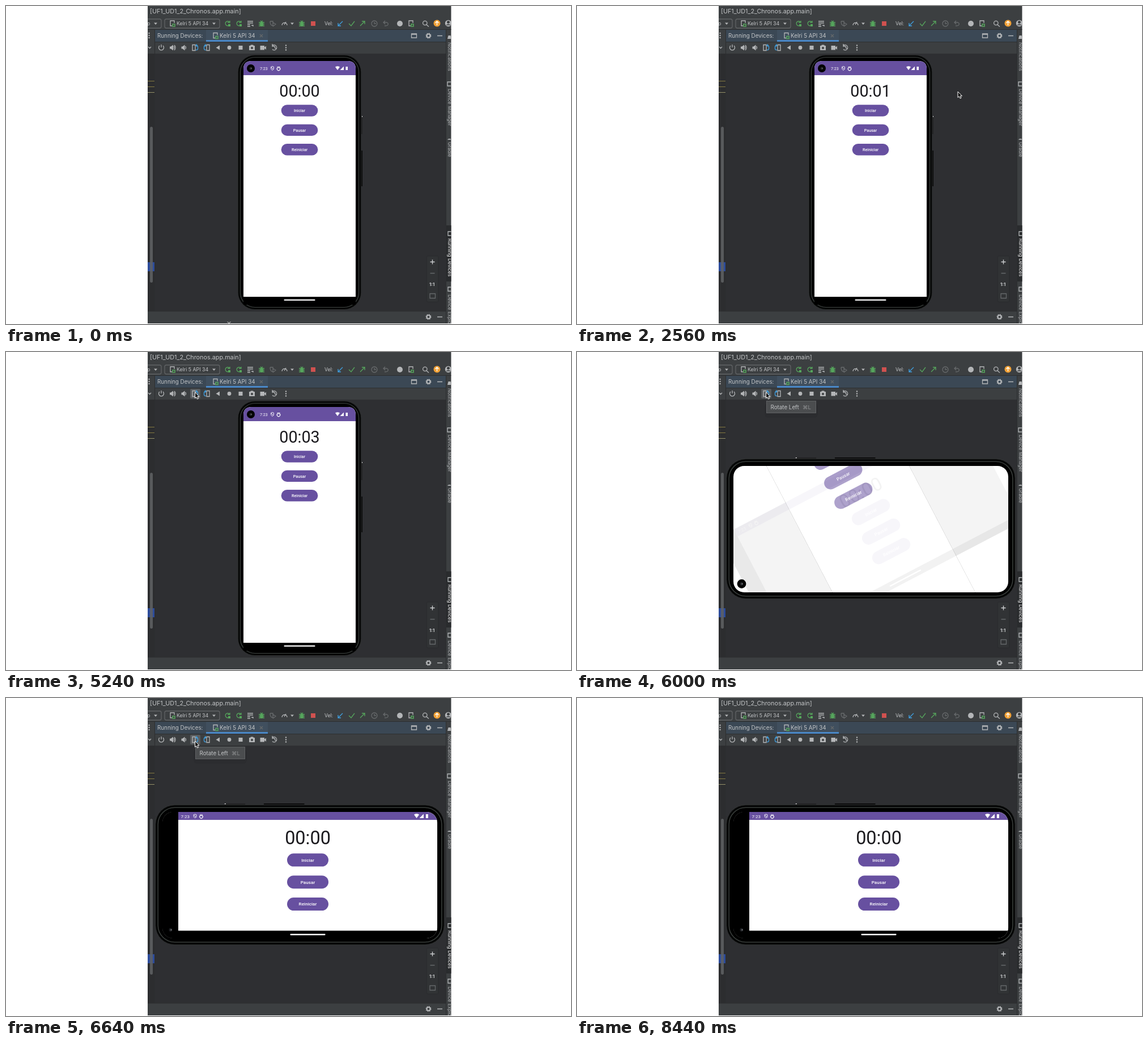
An HTML page for the animation above (8.96 s loop, 997x561 px).

```html
<!DOCTYPE html>
<html lang="es">
<head>
<meta charset="utf-8">
<style>
html, body { margin: 0; width: 100%; height: 100%; overflow: hidden; background: #fff }
svg { display: block; width: 997px; height: 561px; font-family: Inter, "Open Sans", sans-serif }
.line { fill: none; stroke: #b4b6b8; stroke-width: 1.3 }
.gray { fill: #b4b6b8 }
.dim { stroke: #66696b }
.green { stroke: #56a55c }
.blue { stroke: #3f9fe0 }
.roboto { font-family: Roboto, sans-serif }
</style>
</head>
<body>
<svg viewBox="0 0 997 561">
<defs>
  <clipPath id="win"><path d="M250 0H785.5V560H250Z"/></clipPath>
  <clipPath id="tallClip"><path d="M-99 215V-201Q-99-215-85-215H85Q99-215 99-201V215Z"/></clipPath>
  <clipPath id="wideClip"><rect x="-242.5" y="-111.5" width="485" height="223" rx="19"/></clipPath>
  <g id="gear" class="line"><circle r="3" stroke-width="2"/><circle r="4.2" stroke-width="1.6" stroke-dasharray="1.7 1.6"/></g>
  <g id="phone" class="line"><path d="M4-1V-5H-3V4H0"/><path class="green" d="M1 1H5V5H1Z" stroke-width="1.6"/></g>
  <g id="rerun" class="line green"><path d="M3-3A4 4 0 1 0 4 1M4-5V-2H0"/><path d="M1 1H5V5H1Z" fill="#56a55c" stroke="none"/></g>
  <g id="bug"><ellipse cy="1" rx="3" ry="4" fill="#56a55c"/><path class="line green" d="M-5-2H5M-5 1H5M-5 4H5M-2-5L0-3L2-5" stroke-width="1"/></g>
  <path id="down" class="gray" d="M-3-1.5H3L0 2Z"/>
  <g id="dots" class="gray"><circle cy="-4" r="1.2"/><circle r="1.2"/><circle cy="4" r="1.2"/></g>
  <g id="sound"><path class="gray" d="M-5-2H-3L1-5V5L-3 2H-5Z"/><path class="line" d="M2-2.5Q4 0 2 2.5"/></g>
  <g id="turn"><path class="line" d="M-5-5H0V5H-5Z"/><path class="line blue" d="M2-4Q5-4 4.5 0V2Q4 4.5 1 4M3-6L1-4L3-2" stroke-width="1.5"/></g>
  <g id="alerts"><path d="M-2.5-2.5L0-3.5L2.5-2.5Q3 2 0 3.5Q-3 2-2.5-2.5ZM-2-2L2 2" fill="none" stroke="#fff" stroke-width=".9"/>
    <path d="M8.5-2.5H13.5M9-1A2.8 2.8 0 1 0 13-1Z" fill="none" stroke="#fff" stroke-width="1.1"/></g>
  <path id="signal" d="M0-2.5Q4-5 8-2.5L4 3ZM15-3.5V3H8.5ZM18.5-3H22V3H18.5Z" fill="#fff"/>
  <g id="app" class="roboto" text-anchor="middle">
    <text id="count" y="-24.4" font-size="28.7" fill="#1b1a1e">00:00</text>
    <g fill="#6750a0"><rect id="pill" x="-32.3" y="-10.2" width="64.6" height="20.4" rx="10.2"/>
      <use href="#pill" y="34.4"/><use href="#pill" y="68.8"/></g>
    <g fill="#fff" font-size="7.1" font-weight="500" letter-spacing=".05">
      <text y="2.6">Iniciar</text><text y="37">Pausar</text><text y="71.4">Reiniciar</text></g>
  </g>
</defs>

<g clip-path="url(#win)">
  <path d="M250 0H786V560H250Z" fill="#3c3f41"/>
  <path d="M262 84H776V538H262Z" fill="#2e2f32"/>
  <path d="M250 84H262V538H250Z" fill="#2c2d2f"/>
  <path d="M262 42H776V63H262Z" fill="#3b4855"/>
  <path d="M353 42H462V63H353Z" fill="#404f5e"/>
  <path d="M353 60H462V63H353Z" fill="#4a88c7"/>
  <path d="M776 387H786V486H776Z" fill="#292b2d"/>
  <path d="M250 41.5H786M262 63.5H776M262.5 42V538M250 538.5H776M776.5 42V560" stroke="#2c2e30" fill="none"/>
  <path d="M250 132.5H262M250 142.5H262" stroke="#857a42"/>
  <path d="M250 152.5H262" stroke="#949068"/>
  <path d="M250 452H262V468H250Z" fill="#2d4c9b"/>
  <rect x="254" y="213" width="5" height="275" rx="2.5" fill="#606264" opacity=".85"/>

  <g fill="#c3c5c7" font-size="9.8">
    <text x="254" y="12.6" font-size="10.8">[UF1_UD1_2_Chronos.app.main]</text>
    <text x="249" y="34" font-size="8.8">p</text>
    <text x="301" y="34.3" font-size="8.8">Kelri 5 API 34</text>
    <text x="562" y="34.3" font-size="8.6">Vel:</text>
    <text x="267" y="56">Running Devices:</text>
    <text x="377" y="56">Kelri 5 API 34</text>
  </g>

  <!-- main toolbar -->
  <path class="line" stroke-width="1" style="stroke:#606365" d="M250 23H271Q274 23 274 26V36Q274 39 271 39H250M283 23H374Q377 23 377 26V36Q377 39 374 39H283Q280 39 280 36V26Q280 23 283 23Z"/>
  <use href="#down" x="264" y="31"/><use href="#down" x="367" y="31"/><use href="#down" x="505" y="31"/>
  <use href="#phone" x="293" y="31"/><use href="#phone" x="714" y="31"/><use href="#phone" x="369" y="52.5"/>
  <use href="#rerun" x="391" y="31"/><use href="#rerun" x="411" y="31"/>
  <use href="#bug" x="451" y="31"/><use href="#bug" x="522" y="31"/>
  <path class="line" d="M426 27H436M426 30H436M426 33H431M426 36H431M433 34H436V36M487 34A4.5 4.5 0 1 1 496 34M491 33L494 28"/>
  <path class="line dim" d="M466 27H471V35Q466 34 466 27M471 29L476 32L471 36M655 31A5 5 0 1 1 645 31A5 5 0 1 1 655 31M650 28V31H653M666 29H672Q675 30 674 33Q673 35 668 35M669 26L666 29L669 32"/>
  <path d="M538 27H546V35H538Z" fill="#d0514f"/>
  <path class="line blue" stroke-width="1.7" d="M594 27L586 35M586 30V35H591"/>
  <path class="line green" stroke-width="1.8" d="M605 31L609 35L615 27M625 35L633 27M628 27H633V32"/>
  <circle class="gray" cx="695" cy="31" r="5"/>
  <path class="line" stroke-width="1.5" d="M743 30A3.7 3.7 0 1 1 735.6 30A3.7 3.7 0 1 1 743 30M742 33L746 36.5"/>
  <circle cx="760.5" cy="30.5" r="6" fill="#f0a035"/>
  <path class="line" style="stroke:#fff" d="M760.5 34V27M757.5 30L760.5 27L763.5 30"/>
  <g class="gray"><circle cx="780.5" cy="30.5" r="5.7"/><path fill="#3c3f41" d="M778 28.5A2.3 2.3 0 1 1 783 28.5A2.3 2.3 0 1 1 778 28.5M776 34Q780.5 30 785 34Z"/></g>

  <!-- panel header and device toolbar -->
  <use href="#dots" x="252.5" y="52"/><use href="#dots" x="494" y="73.5"/>
  <path class="line dim" stroke-width="1" d="M448 50L453 55M453 50L448 55"/>
  <path class="line" d="M715.5 49H724.5V56H715.5ZM715.5 50H724.5M761 52.5H770M761 548.5H770M251 72L253.5 74.5L256 72"/>
  <use href="#gear" x="745.5" y="52.5"/><use href="#gear" x="745.5" y="548.5"/>
  <rect id="hover" x="325" y="65" width="18" height="17" rx="2" fill="#5a5e61"/>
  <path class="line" d="M271 70A4.5 4.5 0 1 0 277 70M274 68V73M470 70A4.5 4.5 0 1 1 470 76.5M470 67V71H474M474.5 71V74L477 75"/>
  <use href="#sound" x="294" y="73.5"/><path class="line" d="M297 69Q301 73.5 297 78"/>
  <use href="#sound" x="314.5" y="73.5"/>
  <use href="#turn" x="334" y="73.5"/><use href="#turn" transform="translate(354 73.5) scale(-1 1)"/>
  <path class="gray" d="M377 69.5V77.5L370.5 73.5ZM410.5 70H417.5V77H410.5ZM429 70H431L432 68.5H436L437 70H439V78H429ZM448.5 70H456V77.5H448.5ZM456 73L459 70.5V77L456 74.5Z"/>
  <circle class="gray" cx="394" cy="73.5" r="3.4"/><circle cx="434" cy="74" r="2" fill="#3c3f41"/>

  <!-- right tool strip -->
  <g class="gray" font-size="8.5">
    <path d="M779 58L780.5 52H784.5L786 58ZM779 236A4 4 0 0 1 786 236Z"/>
    <path class="line" stroke-width="1.1" d="M779 134H786V141H779ZM786 398H780V405H786M786 496H780V503H786"/>
    <text transform="translate(779.5 64)rotate(90)">Notifications</text>
    <text transform="translate(779.5 146)rotate(90)">Device Manager</text>
    <text transform="translate(779.5 240)rotate(90)">Gradle</text>
    <text transform="translate(779.5 410)rotate(90)" fill="#f0f0f0">Running Devices</text>
    <text transform="translate(779.5 509)rotate(90)">Device Explorer</text>
  </g>

  <!-- device -->
  <g id="body">
    <path d="M109-117H110.5V-85H109Z" fill="#1c1d1d"/><path d="M110-117H111V-115H110Z" fill="#ddd"/>
    <path d="M109-56H111V7H109Z" fill="#0b0b0b"/>
    <rect x="-108.7" y="-224.5" width="217.4" height="449" rx="30" fill="#060707" stroke="#343735" stroke-width=".7"/>
    <rect x="-104.5" y="-220.5" width="209" height="441" rx="26" fill="#000" stroke="#3f4441" stroke-width="1.2"/>
  </g>
  <g id="frame">
    <rect id="blank" x="-242.5" y="-111.5" width="485" height="223" fill="#fff"/>
    <path id="shade" d="M-242.5-111.5H242.5V111.5H-242.5Z" fill="#f4f4f4"/>
    <g id="tall"><g clip-path="url(#tallClip)">
      <path d="M-99-215H99V215H-99Z"/>
      <path d="M-99-215H99V201H-99Z" fill="#fff"/>
      <path d="M-99-215H99V-190H-99Z" fill="#6750a0"/>
      <text class="roboto" x="-70" y="-199.4" font-size="7.1" fill="#fff">7:23</text>
      <use href="#alerts" x="-48" y="-202"/><use href="#signal" x="63" y="-202"/>
      <rect x="-27.5" y="205.5" width="55" height="2.2" rx="1" fill="#fff"/>
      <use href="#app" y="-127.5"/>
      <path id="wash" d="M-99-215H99V215H-99Z" fill="#fff"/>
    </g></g>
    <g id="wide">
      <path d="M-242.5-111.5H242.5V111.5H-242.5Z"/>
      <path id="strip" d="M-242.5-111.5H-214.5V111.5H-242.5Z"/>
      <path d="M-214.5-111.5H242.5V98H-214.5Z" fill="#fff"/>
      <path d="M-214.5-111.5H242.5V-97.5H-214.5Z" fill="#6750a0"/>
      <text class="roboto" x="-210" y="-101" font-size="8" fill="#fff">7:23</text>
      <use href="#alerts" x="-185" y="-104"/><use href="#signal" transform="translate(201.5 -104)scale(1.13)"/>
      <rect x="-17" y="103.5" width="62" height="2.4" rx="1" fill="#fff"/>
      <use href="#app" transform="translate(14 -26.7)scale(1.13)"/>
      <path id="veil" d="M-214.5-111.5H242.5V111.5H-214.5Z"/>
    </g>
  </g>
  <g id="camera"><circle r="7"/><circle r="2.6" fill="#202226"/><circle cx=".8" r=".8" fill="#999"/></g>

  <!-- zoom controls -->
  <rect x="742.5" y="441" width="20.5" height="81" rx="2" fill="#313335" stroke="#292b2d"/>
  <path class="line" style="stroke:#d0d2d4" stroke-width="1.5" d="M748.5 451.5H756.5M752.5 447.5V455.5"/>
  <path class="line dim" stroke-width="1" d="M748.5 471.5H756.5M748 507.5H757.5V515.5H748Z"/>
  <text x="747" y="494.3" font-size="7.8" font-weight="700" fill="#d0d2d4">1:1</text>

  <g id="tip">
    <rect x="331" y="90" width="94" height="26" rx="6" opacity=".06"/>
    <rect x="334.5" y="86.5" width="87" height="21" fill="#4b4d4f" stroke="#5f6163"/>
    <text x="341.5" y="100.8" font-size="9.8" fill="#c3c5c7">Rotate Left</text>
    <text x="398" y="100.8" font-size="9.6" fill="#909294" style="font-family:Inter,'DejaVu Sans',sans-serif">⌘L</text>
  </g>
  <path id="beam" d="M390.5 557.5Q393 557.5 393.5 560Q394 557.5 396.5 557.5" fill="none" stroke="#ddd"/>
  <path id="arrow" d="M0 0V10.5L2.3 8.4L4 12L6 11.2L4.3 7.7H7.5Z" fill="#111" stroke="#fff"/>
</g>
</svg>
<script>
const LOOP = 8960, TURN = 5520, SPIN = 5905, SWAP = 6000, SPIN_END = 6240;
const $ = id => document.getElementById(id);
const clamp = v => Math.min(1, Math.max(0, v));
const ramp = (t, a, b) => clamp((t - a) / (b - a));
const set = (id, name, value) => $(id).setAttribute(name, value);
const fade = (id, v) => set(id, 'opacity', v);

// pointer stops: time, x, y
const stops = [
  [520, 392, 557], [1300, 520, 182], [1480, 520, 182], [2240, 672, 151], [4320, 672, 151],
  [5120, 333.5, 71], [6600, 333.5, 71], [6640, 333.5, 76], [7440, 800, 300]
];

function pointer(t) {
  const i = stops.findIndex(s => s[0] > t);
  if (i < 0) return stops.at(-1).slice(1);
  const [a, b] = [stops[Math.max(0, i - 1)], stops[i]];
  const u = ramp(t, a[0], b[0]), k = u * u * (3 - 2 * u);
  return [a[1] + (b[1] - a[1]) * k, a[2] + (b[2] - a[2]) * k];
}

function draw(t) {
  const turned = t >= TURN, spinning = t >= SPIN && t < SPIN_END;
  const angle = -90 * (1 - ramp(t, SPIN, SPIN_END)) ** 3.5;
  const secs = t < SWAP ? Math.max(0, Math.floor((t - 1400) / 1000)) : 0;
  $('count').textContent = '00:0' + secs;

  set('body', 'transform', turned ? 'translate(518.5 312)rotate(-90)scale(1.135)' : 'translate(518 311)');
  set('frame', 'transform', turned ? 'translate(518.5 312.5)' : 'translate(518 312)');
  set('frame', 'clip-path', turned ? 'url(#wideClip)' : 'none');
  set('camera', 'transform', turned ? 'translate(290.5 409)scale(1.13)' : 'translate(432 110)');

  // the portrait screen washes out to white, then the landscape one covers it
  fade('blank', turned ? 1 : 0);
  fade('shade', spinning ? ramp(t, SPIN, SWAP) : 0);
  set('shade', 'transform', `rotate(${angle})`);
  set('tall', 'transform', turned ? `rotate(${angle})scale(1.13)` : '');
  fade('tall', t < SPIN_END ? 1 : 0);
  fade('wash', 0.43 * ramp(t, SPIN, SWAP) + 0.57 * ramp(t, SWAP, 6060));
  set('wide', 'transform', `rotate(${angle})`);
  fade('wide', ramp(t, 5997, 6075));
  set('strip', 'fill', spinning ? '#2f3233' : '#000');
  fade('veil', 0.18 * ramp(t, SWAP, 6080) * (1 - ramp(t, 6080, SPIN_END)));

  const [x, y] = pointer(t);
  set('arrow', 'transform', `translate(${x} ${y})`);
  fade('arrow', t < 520 ? 0 : 1);
  fade('beam', t < 520 ? 1 : 0);
  fade('hover', x > 324 && x < 344 && y > 62 && y < 84 ? 1 : 0);
  fade('tip', ramp(t, 5680, 5800) * (1 - ramp(t, 6760, 6880)));
}

const start = performance.now();
function tick() {
  draw((performance.now() - start) % LOOP);
  requestAnimationFrame(tick);
}
tick();
</script>
</body>
</html>
```
